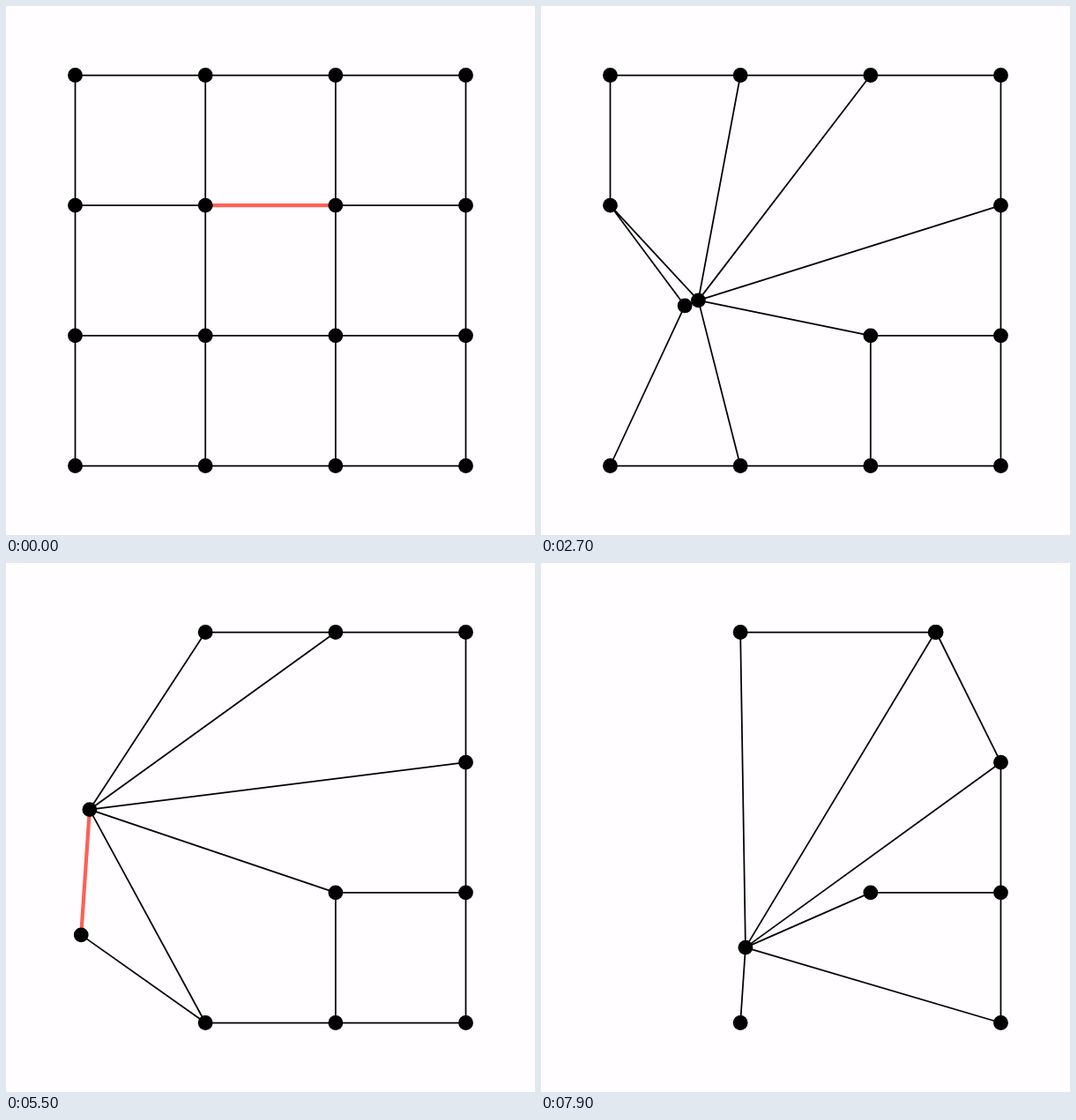
Write an HTML page with a canvas that moves like this. It is 600x600 px and loops after 8000 ms.

```html
<!DOCTYPE html>
<html lang="en">
<head>
<meta charset="utf-8">
<title>Edge contraction on a grid graph</title>
<style>
  html, body { margin: 0; width: 100%; height: 100%; overflow: hidden; background: #fffdff; }
  canvas { display: block; }
</style>
</head>
<body>
<canvas id="stage" width="600" height="600"></canvas>
<script>
const ctx = document.getElementById('stage').getContext('2d');
const SIZE = 4, ORIGIN = 78.5, GAP = 443 / 3, LOOP = 8000;

// Each second the second vertex is merged into the first.
const merges = [[5, 6], [5, 9], [5, 8], [5, 4], [5, 0], [5, 12], [5, 14], [2, 3]];

const grid = Array.from({ length: SIZE * SIZE }, (_, i) => ({
  x: ORIGIN + GAP * (i % SIZE),
  y: ORIGIN + GAP * Math.floor(i / SIZE)
}));

const edges = [];
grid.forEach((_, i) => {
  if (i % SIZE < SIZE - 1) edges.push([i, i + 1]);
  if (i + SIZE < grid.length) edges.push([i, i + SIZE]);
});

const sigmoid = x => 1 / (1 + Math.exp(-x));
const smooth = t => (sigmoid(10 * (t - 0.5)) - sigmoid(-5)) / (1 - 2 * sigmoid(-5));
const mix = (a, b, t) => ({ x: a.x + (b.x - a.x) * t, y: a.y + (b.y - a.y) * t });

function strokeLines(lines, color, width) {
  ctx.beginPath();
  for (const [a, b] of lines) {
    ctx.moveTo(a.x, a.y);
    ctx.lineTo(b.x, b.y);
  }
  ctx.strokeStyle = color;
  ctx.lineWidth = width;
  ctx.stroke();
}

function draw(ms) {
  // Motion is stepped at 15 per second, shown 10 times per second.
  const step = Math.floor(ms / 100);
  const current = Math.floor(step / 10);
  const progress = smooth(Math.round(step % 10 * 1.5) / 15);

  const pos = grid.slice();
  let owner = grid.map((_, i) => i);
  for (const [u, v] of merges.slice(0, current)) {
    pos[u] = mix(pos[u], pos[v], 0.5);
    owner = owner.map(o => o === v ? u : o);
  }
  const [u, v] = merges[current];
  [pos[u], pos[v]] = [mix(pos[u], pos[v], progress / 2), mix(pos[v], pos[u], progress / 2)];

  const plain = [], chosen = [];
  for (const [i, j] of edges) {
    const a = owner[i], b = owner[j];
    if (a === b) continue;
    const active = (a === u && b === v) || (a === v && b === u);
    (active ? chosen : plain).push([pos[a], pos[b]]);
  }

  ctx.fillStyle = '#fffdff';
  ctx.fillRect(0, 0, 600, 600);
  strokeLines(plain, '#000', 1.75);
  strokeLines(chosen, '#fc6255', 4.2);
  ctx.fillStyle = '#000';
  for (const i of new Set(owner)) {
    ctx.beginPath();
    ctx.arc(pos[i].x, pos[i].y, 8.4, 0, 2 * Math.PI);
    ctx.fill();
  }
}

const start = performance.now();
function tick() {
  draw((performance.now() - start) % LOOP);
  requestAnimationFrame(tick);
}
tick();
</script>
</body>
</html>
```
